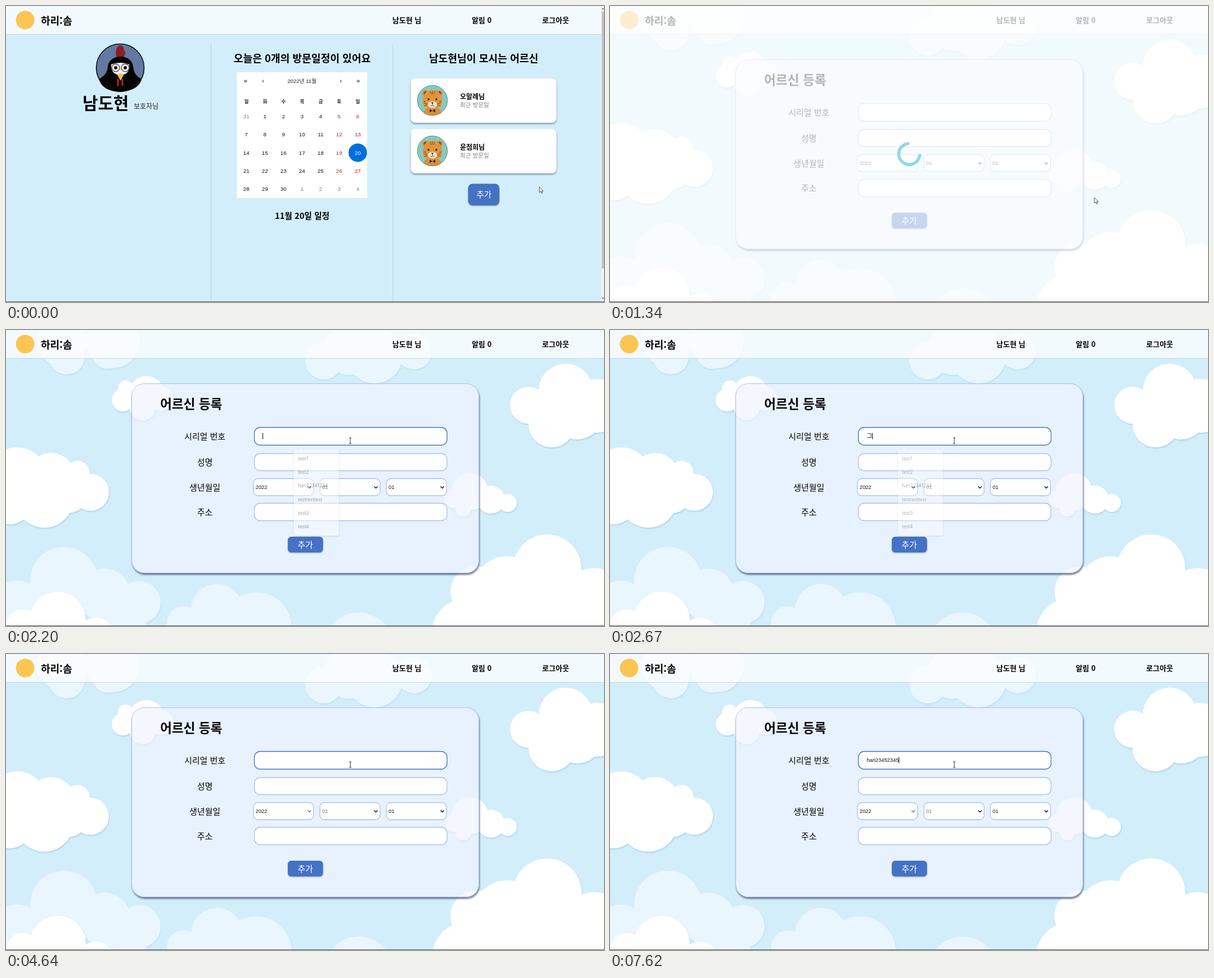
Recreate the animation shown at these times as an HTML page. Size 1063 by 527 pixels, loop 8 s.

```html
<!DOCTYPE html>
<html lang="ko">
<head>
<meta charset="utf-8">
<title>어르신 등록</title>
<style>
html, body { margin: 0; width: 100%; height: 100%; overflow: hidden; background: #d3eefb; }
#stage { position: relative; width: 1063px; height: 527px; overflow: hidden; background: #d3eefb; }
#stage > div, svg { position: absolute; left: 0; top: 0; width: 1063px; height: 527px; }
text { font-family: "Noto Sans CJK KR", "Noto Sans KR", "Noto Sans CJK", sans-serif; white-space: pre; }
.b { font-weight: 700; }
.m { text-anchor: middle; }
.a { font-family: "Liberation Sans", Arial, "Noto Sans CJK KR", sans-serif; }
.n { font-family: "Noto Sans", "Open Sans", sans-serif; }
.cloud { fill: #fff; filter: drop-shadow(1px 2px 1px rgba(90, 150, 185, .28)); }
.lift { filter: drop-shadow(0 2px 1.5px rgba(60, 85, 105, .6)); }
.button { fill: #4472c4; filter: drop-shadow(0 1.5px 1px rgba(50, 80, 150, .5)); }
.button.hover { filter: none; stroke: #8ba8dc; }
.field { fill: #fff; stroke: #a9c1e8; stroke-width: 1.3; }
.popup { filter: drop-shadow(0 1px 1.5px rgba(0, 0, 0, .3)); }
.card { position: absolute; left: 223px; top: 94.5px; width: 618px; height: 338.5px; box-sizing: border-box;
  border: 1.5px solid #a8c1e9; border-radius: 23px; background: rgba(240, 244, 255, .7);
  background-clip: padding-box; box-shadow: 1px 3px 3px rgba(50, 60, 85, .65); }
</style>
</head>
<body>
<div id="stage"></div>
<script>
(() => {
const LOOP = 8000;
const stage = document.getElementById('stage');

const text = (x, y, size, str, cls = '', fill = '#000', attrs = '') =>
  `<text x="${x}" y="${y}" dy=".37em" font-size="${size}" class="${cls}" fill="${fill}" ${attrs}>${str}</text>`;
const rect = (x, y, w, h, r, attrs) =>
  `<rect x="${x}" y="${y}" width="${w}" height="${h}" rx="${r}" ${attrs}/>`;
const circle = (x, y, r, attrs = '') => `<circle cx="${x}" cy="${y}" r="${r}" ${attrs}/>`;
const path = (d, attrs) => `<path d="${d}" ${attrs}/>`;
const svg = body => `<svg viewBox="0 0 1063 527">${body}</svg>`;

const user = '남도현';
const header = (w) =>
  rect(0, 0, w, 50.5, 0, 'fill="#fff" fill-opacity=".72"') +
  rect(0, 50, w, 1, 0, 'fill="#b9ccd8" fill-opacity=".8"') +
  circle(34, 25, 16.5, 'fill="#fcc553"') +
  text(62, 26, 18, '하리:솜', 'b') +
  text(712.5, 25.5, 13, user + ' 님', 'b m') +
  text(845.5, 25.5, 13, '알림 0', 'b m') +
  text(977, 25.5, 13, '로그아웃', 'b m');

// ---- Home page ----
const rooster =
  circle(203, 110, 42.5, 'fill="#64799f"') +
  path('M197 93C193 82 197 70 203 70C210 70 208 76 211 80C214 85 209 88 210 94Z', 'fill="#8e1b22"') +
  path('M165 130C176 124 180 118 181 108C183 84 224 84 226 108C227 118 231 125 241 130C238 145 220 152.5 203 152.5S170 147 165 130Z', 'fill="#050505"') +
  path('M187 104Q203 98 219 104Q221 122 203 123Q186 122 187 104Z', 'fill="#f3f1ed"') +
  [195, 212].map(x => circle(x, 110, 6.8, 'fill="#fff" stroke="#555" stroke-width="1.6"') + circle(x, 110, 3, 'fill="#111"')).join('') +
  path('M198 123Q203 117 209 123L203.5 133Z', 'fill="#f2c14a"') +
  path('M199 131v10M207 131v10', 'stroke="#a5232a" stroke-width="3.4" stroke-linecap="round"') +
  circle(203, 110, 42.5, 'fill="none" stroke="#0c0f16" stroke-width="1.6"');

const bear = (x, y) => `<g transform="translate(${x} ${y})">` +
  circle(0, 0, 27, 'fill="#87c9be"') +
  path('M-16 21.7C-15 9 15 9 16 21.7A27 27 0 0 1 -16 21.7Z', 'fill="#d98f3b"') +
  [-1, 1].map(s => circle(12.5 * s, -13, 5.5, 'fill="#d98f3b"') + circle(12.5 * s, -13, 3, 'fill="#7b4a24"')).join('') +
  path('M0 -18C14 -18 17 -8 17 2C17 12 9 15 0 15S-17 12 -17 2C-17 -8 -14 -18 0 -18Z', 'fill="#e0953d"') +
  path('M-4 -16l2 5M0 -17v6M4 -16l-2 5M-16 2h4M16 2h-4', 'stroke="#9b5a25" stroke-width="1.3"') +
  '<ellipse cx="0" cy="7.5" rx="8" ry="6" fill="#f4e6cf"/>' +
  circle(-7, -2, 1.7, 'fill="#222"') + circle(7, -2, 1.7, 'fill="#222"') +
  path('M-2.5 3.5h5L0 6.5Z', 'fill="#332a2a"') +
  path('M0 6v3q-2 2 -4 0M0 9q2 2 4 0M-9 6l-6 -1M-9 8l-6 2M9 6l6 -1M9 8l6 2', 'fill="none" stroke="#4a3828" stroke-width=".8"') +
  path('M0 18.5L-5 15.5V21.5ZL5 15.5V21.5Z', 'fill="#29313c"') +
  circle(0, 0, 26.7, 'fill="none" stroke="#4f6f69" stroke-width=".7"') + '</g>';

const elder = (y, name) =>
  rect(719.5, y, 259, 79, 8, 'fill="#fff" class="lift"') + bear(758, y + 39) +
  text(807, y + 33, 12, name + '님', 'b') + text(807, y + 47, 10.6, '최근 방문일', '', '#808080');

function calendar() {
  let s = rect(410.5, 118, 231.5, 224, 0, 'fill="#fff"');
  [['«', 426], ['‹', 457], ['›', 595], ['»', 626]].forEach(([c, x]) => s += text(x, 132.5, 11, c, 'a m'));
  s += text(526, 133.5, 9.6, '2022년 11월', 'a m', '#222');
  [...'월화수목금토일'].forEach((d, i) => s += text(427.5 + 33 * i, 169.5, 8.5, d, 'b m', '#222'));
  s += circle(625.3, 261.2, 16.4, 'fill="#006edc"');
  for (let i = 0; i < 35; i++) {
    const inside = i > 0 && i < 31;
    const day = i === 0 ? 31 : inside ? i : i - 30;
    const fill = i === 20 ? '#fff' : !inside ? '#7d7d7d' : (i + 6) % 7 > 3 && i % 7 > 4 || i % 7 === 6 ? '#b5251c' : '#111';
    s += text(427.3 + 33 * (i % 7), 196.7 + 32.1 * Math.floor(i / 7), 9.8, day, 'a m', fill);
  }
  return s;
}

const homePage = svg(
  header(1058) +
  rect(364, 67, 1, 460, 0, 'fill="#b3cde2"') + rect(687.5, 67, 1, 460, 0, 'fill="#b3cde2"') +
  rooster + text(136, 172.5, 29.8, user, 'b') + text(227, 179, 12, '보호자님', '', '#222') +
  text(526.5, 93, 18.2, '오늘은 0개의 방문일정이 있어요', 'b m') + calendar() +
  text(526.5, 374, 14.7, '11월 20일 일정', 'b m') +
  text(849, 93, 18.2, user + '님이 모시는 어르신', 'b m') +
  elder(129, '오말례') + elder(219, '윤점희') +
  rect(821.5, 316.5, 55.5, 38.5, 8, 'class="button" id="add"') + text(849.5, 336, 14.8, '추가', 'm', '#fff') +
  rect(1058, 0, 5, 527, 0, 'fill="#f1f1f1"') + rect(1059, 10, 4, 457, 0, 'fill="#c1c1c1"') +
  path('M1059 6l2 -3l2 3ZM1059 519l2 3l2 -3Z', 'fill="#666"'));

// ---- Registration page: each cloud is opacity | x y r, ... ----
const clouds = [
  '1|20 262 53,80 262 43,127 255 22,150 289 33,68 300 52,5 300 46,110 290 36',
  '1|208 125 20,213 104 14,250 114 32,276 122 22,243 138 23',
  '1|995 108 48,929 134 33,970 168 41,1050 135 48,1015 150 45',
  '1|825 288 33,796 301 16,862 302 25,892 308 16,813 318 14',
  '1|962 425 61,890 462 59,835 466 45,1045 482 58,820 540 63,940 527 90',
  '.5|103 446 60,175 472 47,237 485 38,20 491 45,200 520 50',
  '1|92 516 50,30 527 30,160 545 33',
  '.5|375 498 46,445 530 63,316 522 30',
  '.5|627 565 62',
  '.5|108 47 32,180 43 26,190 20 48,100 20 45',
  '.5|565 55 33,655 45 50,725 38 32,610 35 45'
].map(row => {
  const [alpha, list] = row.split('|');
  return `<g class="cloud" opacity="${alpha}">` + list.split(',').map(c => circle(...c.split(' '))).join('') + '</g>';
}).join('');

const select = (x, value, id) =>
  rect(x, 264.5, 107, 30.5, 8, 'class="field"') + text(x + 4, 279.5, 9.33, value, 'a', '#111', `id="${id}"`) +
  path(`M${x + 96.5} 278.5l3 3l3 -3`, `fill="none" stroke="#111" stroke-width="1.5" id="${id}Arrow"`);

const popup = (id, w, items) => `<g class="popup" id="${id}">` +
  path('M519 214l5.5 -5l5.5 5Z', 'fill="#fff"') +
  rect(511.5, 213, w, 8 + 24.2 * items.length, 2, 'fill="#fff"') +
  items.map((s, i) => text(519, 229 + 24.2 * i, 8.2, s, 'n', '#333')).join('') + '</g>';

const labels = [['시리얼 번호', 189], ['성명', 235.5], ['생년월일', 280], ['주소', 324.5]];
const formPage = svg(clouds + header(1063)) + '<div class="card"></div>' + svg(
  text(274, 131.5, 22.6, '어르신 등록', 'b') +
  labels.map(([s, y]) => text(353.5, y, 15, s, 'm')).join('') +
  rect(441.5, 173.5, 342.5, 31.5, 10, 'class="field" id="serial"') +
  rect(441.5, 220, 342.5, 30.5, 10, 'class="field"') +
  rect(441.5, 308.5, 342.5, 31, 10, 'class="field"') +
  select(439.7, '2022', 'year') + select(558, '01', 'month') + select(676, '01', 'day') +
  rect(501, 368, 62.5, 28, 6, 'class="button"') +
  text(532, 382.5, 15, '추가', 'm', '#fff') +
  text(456.3, 188.5, 9.33, '', 'a', '#111', 'id="typed"') +
  rect(456, 183.5, 1, 11, 0, 'fill="#000" id="caret"') +
  popup('allHints', 80.5, ['test1', 'test2', 'hari12341234', 'testtesttest', 'test3', 'test4']) +
  popup('hints', 97, ['hari12341234', 'hari123412341234']) +
  '<g id="loading">' + rect(0, 0, 1063, 527, 0, 'fill="#fff" fill-opacity=".7"') +
  path('M532 244.8A18.7 18.7 0 1 0 550.7 263.5', 'fill="none" stroke="#8fd9e7" stroke-width="5.5"') + '</g>');

const overlay = svg(
  rect(0, 526, 1063, 1, 0, 'fill="#565c61"') +
  '<g id="pointer">' + circle(0, 0, 8.5, 'fill="#d8dc32" fill-opacity=".62" id="halo"') +
  path('M0 0V10L2.4 8L4 11.4L5.6 10.7L4.1 7.4H7Z', 'fill="#fff" stroke="#222" stroke-width=".8" id="arrow"') +
  path('M-1.2 .5Q0 -1 1.2 .5V4.5L5 5.3Q6.8 5.7 6.5 7.5L5.5 12H0L-2.8 7.5Q-3 6 -1.2 7Z', 'fill="#fff" stroke="#222" stroke-width=".8" id="hand"') +
  path('M-2 -5H2M0 -5V5M-2 5H2', 'fill="none" stroke="#333" stroke-width="1" id="beam"') + '</g>');

stage.innerHTML = `<div id="home">${homePage}</div><div id="form">${formPage}</div><div>${overlay}</div>`;

// ---- Timing ----
const el = {};
stage.querySelectorAll('[id]').forEach(n => { el[n.id] = n; });
const show = (id, on) => { el[id].style.visibility = on ? 'inherit' : 'hidden'; };
const at = (table, t) => table.reduce((hit, row) => row[0] <= t ? row : hit);

const serial = 'hari23452345';
const keys = [4830, 4890, 5030, 5160, 5960, 6160, 6360, 6570, 7020, 7220, 7420, 7620];
const typing = [
  [0, '', 0], [2070, '', 1], [2600, '그', 1], [3010, '', 1], [3570, '', 0], [4100, '', 1], [4640, '', 0],
  ...keys.map((t, i) => [t, serial.slice(0, i + 1), 1]), [5690, 'hari', 0]
].sort((a, b) => a[0] - b[0]);
const allFade = [[0, 0], [2140, .2], [2200, .45], [2270, .7], [2330, .9], [2400, 1],
  [2600, .66], [2670, .36], [2740, .12], [2810, 0]];
const hintFade = [[0, 0], [4830, .5], [4890, 1], [6030, .5], [6090, 0]];

// Stepped, eased travel between two points
function travel(t, start, step, count, from, to) {
  const k = Math.max(0, Math.min(count, Math.floor((t - start) / step + 1.001))) / count;
  const e = k * k * (3 - 2 * k);
  return from.map((v, i) => v + (to[i] - v) * e);
}

function draw(t) {
  const onForm = t >= 1340;
  show('home', !onForm);
  show('form', onForm);
  show('loading', onForm && t < 1400);

  const [x, y] = onForm
    ? travel(t, 1470, 66.25, 9, [861, 341], [612, 197])
    : travel(t, 70, 70, 8, [948, 322], [860, 341]);
  const overInput = onForm && x > 441 && x < 784 && ((y > 173 && y < 205) || (y > 220 && y < 251));
  const overButton = !onForm && x < 877 && y > 316;
  el.pointer.setAttribute('transform', `translate(${x} ${y})`);
  show('beam', overInput);
  show('hand', overButton);
  show('arrow', !overInput && !overButton);
  show('halo', (t >= 1220 && t < 1340) || (t >= 2070 && t < 2200));
  el.add.classList.toggle('hover', overButton);

  const [, str, caret] = at(typing, t);
  el.typed.textContent = str;
  el.typed.setAttribute('font-size', str === '그' ? 11 : 9.33);
  el.caret.setAttribute('x', 456 + (str ? el.typed.getComputedTextLength() : 0));
  show('caret', onForm && caret);
  el.serial.style.stroke = t >= 2070 ? '#4472c4' : '';
  el.allHints.style.opacity = at(allFade, t)[1];
  el.hints.style.opacity = at(hintFade, t)[1];
  el.month.setAttribute('fill', t >= 2600 ? '#777' : '#111');
  el.yearArrow.setAttribute('stroke', t >= 2740 ? '#777' : '#111');
}

const begin = performance.now();
function tick() {
  draw((performance.now() - begin) % LOOP);
  requestAnimationFrame(tick);
}
tick();
})();
</script>
</body>
</html>
```
